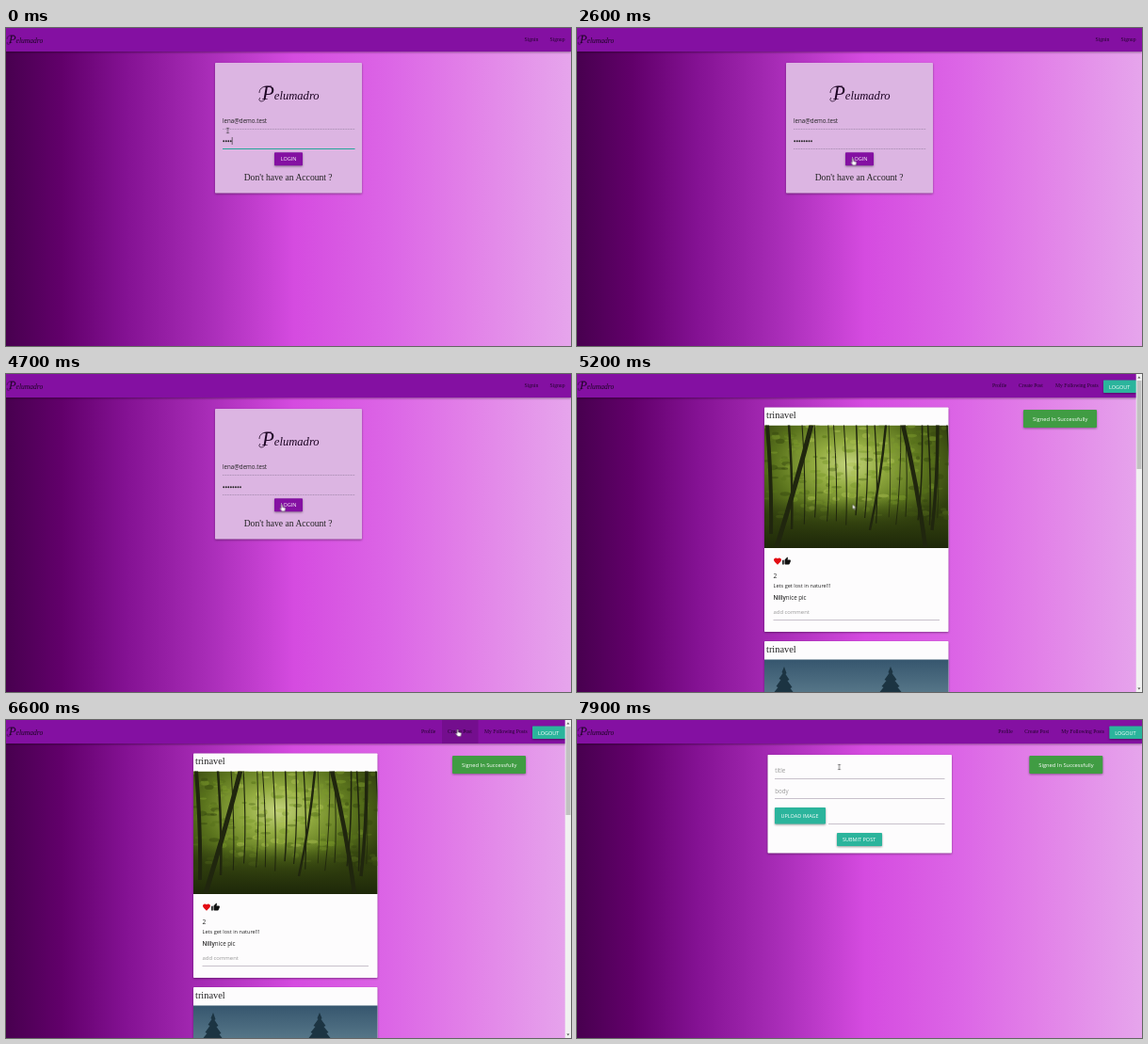
An HTML page for the animation above (8 s loop, 600 by 338 pixels).

```html
<!DOCTYPE html>
<html lang="en">
<head>
<meta charset="utf-8">
<title>Photo sharing demo</title>
<style>
html, body { margin: 0; width: 100%; height: 100%; overflow: hidden; }
body {
  background: linear-gradient(90deg, #48004f 0, #62006b 10%, #831192 21%, #a92db8 36%,
    #d54be0 51%, #dc66e6 68%, #e281e8 82%, #e6a5ec 100%);
}
svg { display: block; width: 600px; height: 338px; }
text { font-family: "Open Sans", "Noto Sans", sans-serif; font-size: 6.2px; fill: #222; white-space: pre; }
.serif, .logo text { font-family: "Liberation Serif", "Noto Serif", serif; }
.logo text { font-size: 12.6px; font-style: italic; fill: #1d0524; }
.logo path { fill: none; stroke: #1d0524; stroke-width: .8; }
.link { font-size: 5.65px; fill: #24042e; }
.name { font-size: 10.4px; }
.hint { fill: #999; }
.label { font-size: 5.5px; fill: #fff; }
.line { stroke: #a49aaa; stroke-width: .6; }
.dotted { stroke: #8f7b9a; stroke-dasharray: 1 .6; }
.raised { filter: drop-shadow(0 1px .8px rgba(0, 0, 0, .38)); }
.purple { fill: #8410a2; }
.teal { fill: #2bb49c; }
.green { fill: #409c43; }
.paper { fill: #fdfcfd; }
.hover { fill: #000; fill-opacity: .12; }

/* Hard switches */
.timed { animation: 8s step-end infinite; opacity: 0; }
#login { animation-name: login; }
#feed { animation-name: feed; }
#create { animation-name: create; }
#focus, #caret { animation-name: focus; }
#hover1 { animation-name: hover1; }
#hover2 { animation-name: hover2; }
#beam { animation-name: beam; }
#arrow { animation-name: arrow; }
#hand { animation-name: hand; }
@keyframes login { 0% { opacity: 1 } 62.5%, 100% { opacity: 0 } }
@keyframes feed { 0% { opacity: 0 } 62.5% { opacity: 1 } 86.25%, 100% { opacity: 0 } }
@keyframes create { 0% { opacity: 0 } 86.25%, 100% { opacity: 1 } }
@keyframes focus { 0% { opacity: 1 } 30%, 100% { opacity: 0 } }
@keyframes hover1 { 0% { opacity: 0 } 80% { opacity: 1 } 86.25%, 100% { opacity: 0 } }
@keyframes hover2 { 0% { opacity: 0 } 86.25% { opacity: 1 } 92.5%, 100% { opacity: 0 } }
@keyframes beam { 0% { opacity: 1 } 19.5% { opacity: 0 } 95.5%, 100% { opacity: 1 } }
@keyframes arrow {
  0% { opacity: 0 } 19.5% { opacity: 1 } 26% { opacity: 0 } 62.5% { opacity: 1 }
  80% { opacity: 0 } 92.5% { opacity: 1 } 95.5%, 100% { opacity: 0 }
}
@keyframes hand {
  0% { opacity: 0 } 26% { opacity: 1 } 62.5% { opacity: 0 }
  80% { opacity: 1 } 92.5%, 100% { opacity: 0 }
}

#typing { animation: typing 8s step-end infinite; }
@keyframes typing {
  0% { transform: none }
  4% { transform: translateX(2.55px) }
  8% { transform: translateX(5.1px) }
  11.5% { transform: translateX(7.65px) }
  15%, 100% { transform: translateX(10.2px) }
}

#pointer { animation: pointer 8s ease-in-out infinite; }
@keyframes pointer {
  0%, 17.5% { transform: translate(235.5px, 109px) }
  28%, 74% { transform: translate(292.6px, 138.5px) }
  80.5%, 91.25% { transform: translate(479.4px, 10px) }
  97%, 100% { transform: translate(278.5px, 50px) }
}
</style>
</head>
<body>
<svg viewBox="0 0 600 338">
  <defs>
    <g id="logo" class="logo">
      <text x="4" y="16"><tspan font-size="21">P</tspan>elumadro</text>
      <path d="M7 16C3 20-1 17 2 14M1 9C1 3 7 1 14 2"/>
    </g>
    <g id="links">
      <text class="serif link" x="441" y="14">Profile</text>
      <text class="serif link" x="469" y="14">Create Post</text>
      <text class="serif link" x="508" y="14">My Following Posts</text>
      <rect class="teal raised" x="559" y="6.5" width="35" height="13.5" rx=".7"/>
      <text class="label" x="565" y="15.6">LOGOUT</text>
      <rect class="green raised" x="474" y="38" width="78" height="19" rx="1"/>
      <text class="label" x="484" y="49.8" style="font-size:5.75px">Signed In Successfully</text>
    </g>
    <g id="bar">
      <rect class="purple raised" width="600" height="25"/>
      <use href="#logo" transform="translate(.5 6.5) scale(.6)"/>
    </g>
    <radialGradient id="glow" cx=".46" cy=".32" r=".62">
      <stop offset="0" stop-color="#c3d37c"/>
      <stop offset=".3" stop-color="#92ab40"/>
      <stop offset=".65" stop-color="#5b741d"/>
      <stop offset="1" stop-color="#303e0e"/>
    </radialGradient>
    <linearGradient id="ground" x2="0" y2="1">
      <stop offset="0" stop-color="#2c3a0d" stop-opacity="0"/>
      <stop offset=".5" stop-color="#2d3b0d" stop-opacity=".85"/>
      <stop offset="1" stop-color="#1d2709"/>
    </linearGradient>
    <linearGradient id="dusk" x2="0" y2="1">
      <stop offset="0" stop-color="#36566e"/>
      <stop offset="1" stop-color="#567688"/>
    </linearGradient>
    <clipPath id="frame"><rect x="199" y="54.5" width="195.5" height="130.5"/></clipPath>
  </defs>

  <g id="login" class="timed">
    <use href="#bar"/>
    <text class="serif link" x="550.5" y="14">Signin</text>
    <text class="serif link" x="577.5" y="14">Signup</text>
    <rect class="raised" x="222" y="37" width="156" height="138.5" rx=".8" fill="#dcb5e2"/>
    <use href="#logo" x="268" y="60"/>
    <text x="230" y="101.3">lena@demo.test</text>
    <path class="line dotted" d="M230 107.5H370.5M230 128.5H370.5"/>
    <g id="dots"></g>
    <g id="typing">
      <rect x="239.8" y="116" width="14" height="9" fill="#dcb5e2"/>
      <path id="caret" class="timed" d="M240.2 116V124" stroke="#222" stroke-width=".6"/>
    </g>
    <path id="focus" class="timed" d="M230 128.5H370.5" stroke="#26a69a" stroke-width="1"/>
    <rect class="purple raised" x="285" y="132.3" width="30" height="14" rx=".8"/>
    <text class="label" x="291.7" y="141.4">LOGIN</text>
    <text class="serif" x="252.7" y="161.5" style="font-size:9.6px">Don't have an Account ?</text>
  </g>

  <g id="feed" class="timed">
    <use href="#bar"/>
    <rect id="hover1" class="hover timed" x="463" width="38.5" height="25"/>
    <use href="#links"/>
    <rect class="paper raised" x="199" y="35.5" width="195.5" height="238.5" rx=".8"/>
    <text class="serif name" x="201" y="46.5">trinavel</text>
    <g clip-path="url(#frame)">
      <rect x="199" y="54.5" width="195.5" height="130.5" fill="url(#glow)"/>
      <g id="leaves"></g>
      <rect x="199" y="132" width="195.5" height="53" fill="url(#ground)"/>
      <g id="trunks" fill="none" stroke="#20260e"></g>
    </g>
    <path transform="translate(208.2 194.2) scale(.4)" fill="#e30b13" d="M12 21.3C5.4 15.4 2 12.3 2 8.5 2 5.4 4.4 3 7.5 3c1.7 0 3.4.8 4.5 2.1C13.1 3.800 14.800 3 16.500 3 19.600 3 22 5.400 22 8.500c0 3.800-3.400 6.900-10 12.800z"/>
    <path transform="translate(217.700 194.200) scale(.4)" fill="#111" d="M1 21h4V9H1zM23 10c0-1.100-.9-2-2-2h-6.300l1-4.900-1.500-2.100L7.600 7.600C7.200 8 7 8.500 7 9v10c0 1.100.9 2 2 2h9c.8 0 1.500-.5 1.800-1.200l3-7.100c.1-.2.2-.4.2-.7z"/>
    <text x="208.500" y="216.700" style="font-size:6.6px">2</text>
    <text x="208.500" y="227" style="font-size:5.600px">Lets get lost in nature!!!</text>
    <text x="208.500" y="240.200"><tspan font-weight="600">Nilly</tspan>nice pic</text>
    <text class="hint" x="208.500" y="255" style="font-size:5.900px">add comment</text>
    <path class="line" d="M208.500 261.500H385"/>
    <rect class="paper raised" x="199" y="284" width="195.500" height="60" rx=".8"/>
    <text class="serif name" x="201" y="295.500">trinavel</text>
    <rect x="199" y="303.500" width="195.500" height="35" fill="url(#dusk)"/>
    <path fill="#1c3442" d="M220 311l2.500 7-1 1 4 6-2 1 5 7-2 1 3 4h-20l4-5-2-1 5-7-2-1 4-6-1-1zM333 311l2.500 6-1 1 5 7-2 1 5 6-2 1 4 5h-23l4-5-2-1 5-6-2-1 5-7-1-1z"/>
    <rect x="593.700" width="6.300" height="338" fill="#f1f1f1"/>
    <rect x="594.500" y="7" width="5" height="94" fill="#c1c1c1"/>
    <path fill="#555" d="M595.400 4.500h3l-1.500-2zM595.400 333.500h3l-1.500 2z"/>
  </g>

  <g id="create" class="timed">
    <use href="#bar"/>
    <rect id="hover2" class="hover timed" x="469" width="38.500" height="25"/>
    <use href="#links" x="6.300"/>
    <rect class="paper raised" x="202.500" y="37" width="195.500" height="104.500" rx=".8"/>
    <text class="hint" x="210.300" y="56.300">title</text>
    <text class="hint" x="210.300" y="77.500">body</text>
    <path class="line" d="M210 62.500H390.500M210 83.500H390.500M267 110.500H390.500"/>
    <rect class="teal raised" x="210" y="93" width="54" height="17.500" rx=".8"/>
    <text class="label" x="216.500" y="103.700">UPLOAD IMAGE</text>
    <rect class="teal raised" x="276" y="120" width="48" height="14" rx=".8"/>
    <text class="label" x="282" y="129.200">SUBMIT POST</text>
  </g>

  <g id="pointer">
    <path id="beam" class="timed" d="M-1.300-2.600H1.300M0-2.600V2.600M-1.300 2.600H1.300" fill="none" stroke="#222" stroke-width=".6"/>
    <path id="arrow" class="timed" d="M0 0V5.200L1.200 4.100 2 6 2.900 5.600 2.100 3.800H3.700z" fill="#fff" stroke="#222" stroke-width=".35"/>
    <path id="hand" class="timed" d="M-.5.500Q.2-.6.900.500V2.900L3.600 3.400Q4.400 3.600 4.200 4.500L3.600 7.400H.4L-1.900 4.500Q-1.800 3.600-.5 4.400z" fill="#fff" stroke="#222" stroke-width=".4"/>
  </g>
</svg>
<script>
const add = (id, tag, attrs) => {
  const node = document.createElementNS("http://www.w3.org/2000/svg", tag);
  for (const key in attrs) node.setAttribute(key, attrs[key]);
  document.getElementById(id).append(node);
};

let seed = 11;
const random = () => (seed = seed * 16807 % 2147483647) / 2147483647;

for (let i = 0; i < 8; i++) {
  add("dots", "circle", { cx: 231.2 + i * 2.55, cy: 120.3, r: .95, fill: "#222" });
}

// Foliage gets darker towards the sides
const greens = ["#a9bf50", "#7d9a2d", "#57701b", "#37490f"];
for (let i = 0; i < 240; i++) {
  const x = 199 + random() * 196, y = 54 + random() * 100;
  const shade = Math.min(3, Math.floor(random() * 2 + Math.abs(x - 290) / 52));
  add("leaves", "ellipse", {
    cx: x, cy: y, rx: 2 + random() * 4, ry: 1 + random() * 2, fill: greens[shade], opacity: .5
  });
}

const trunk = (top, bottom, foot, width) => add("trunks", "path", {
  d: `M${top} 54Q${(top + bottom) / 2 + 3} 115 ${bottom} ${foot}`, "stroke-width": width
});
trunk(249, 212, 184, 5);
trunk(346, 370, 184, 4.5);
trunk(202, 206, 170, 4);
trunk(383, 377, 166, 3.5);
trunk(225, 228, 165, 2.5);
trunk(328, 311, 166, 2.5);
for (let x = 238; x < 394; x += 11) trunk(x + random() * 8, x + random() * 6, 150 + random() * 12, .6 + random());
</script>
</body>
</html>
```
